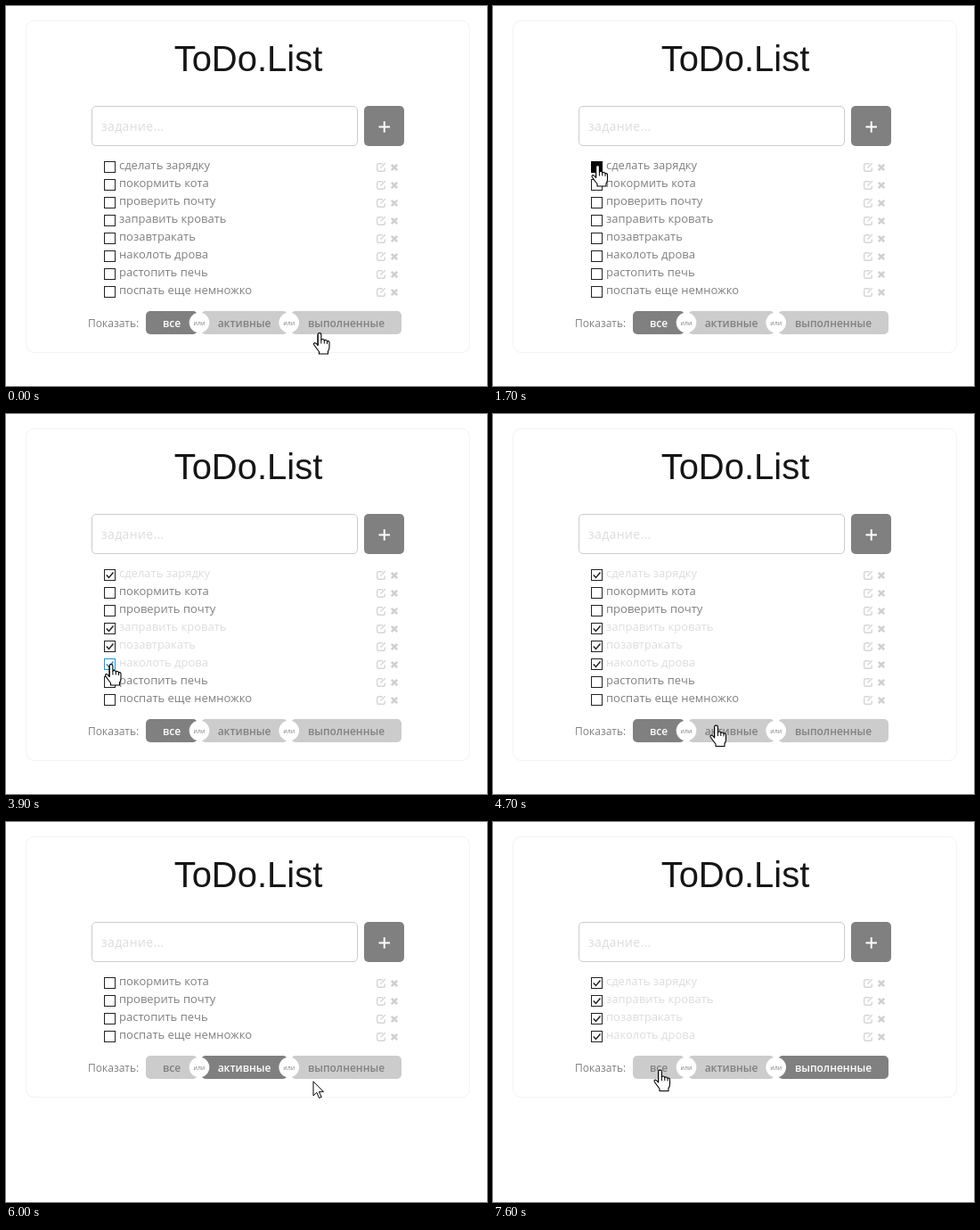
An HTML page for the animation above (8000 ms loop, 540 px wide and 426 px high).

```html
<!DOCTYPE html>
<html lang="ru">
<head>
<meta charset="utf-8">
<title>ToDo.List</title>
<style>
  html, body { margin: 0; width: 100%; height: 100%; overflow: hidden; background: #fff; }
  svg { display: block; width: 540px; height: 426px; }
  text { font-family: "Open Sans", "Noto Sans", sans-serif; fill: #808080; }
  .title { font: 40px "Liberation Sans", Arial, sans-serif; fill: #161616; text-anchor: middle; }
  .hint { font-size: 14px; letter-spacing: .35px; fill: #ddd; }
  .task { font-size: 13px; }
  .label { font-size: 12px; }
  .tab { font-size: 12px; font-weight: 600; text-anchor: middle; }
  .or { font-size: 7px; text-anchor: middle; }
</style>
</head>
<body>
<svg id="stage" viewBox="0 0 540 426">
  <rect id="card" x="22.5" y="16.5" width="498" rx="9" fill="#fff" stroke="#f3f3f3"/>
  <text class="title" x="272" y="73">ToDo.List</text>
  <rect x="96.5" y="112.5" width="298" height="44" rx="4.5" fill="#fff" stroke="#ccc"/>
  <text class="hint" x="107" y="140">задание...</text>
  <rect x="402" y="112" width="45" height="45" rx="5" fill="#808080"/>
  <path d="M418.5 135.5h12.5M424.75 129.2v12.5" stroke="#fff" stroke-width="2"/>
  <g id="list"></g>
  <g id="filter"><text class="label" x="92" y="18">Показать:</text></g>
  <g id="cursor" stroke="#000" stroke-linejoin="round">
    <path id="arrow" fill="#fff" d="M0 0V16L3.8 12.4L6.6 18.6L9.2 17.5L6.4 11.5H11.5Z"/>
    <g id="hand">
      <path fill="#fff" stroke-width="1.1" d="M-1.9 2a1.9 1.9 0 0 1 3.8 0V8a1.8 1.8 0 0 1 3.4 .6a1.8 1.8 0 0 1 3.2 .8a1.6 1.6 0 0 1 2.5 1.4V16Q11 19 9.5 20.5V23.5H-.5V21Q-3 18-6.2 13.3Q-7 11.5-5.5 11Q-4 11-1.9 14Z"/>
      <path fill="none" d="M-1.9 2V14M1.9 8v4M5.3 8.6v3.4M8.5 9.4v3"/>
    </g>
  </g>
</svg>
<script>
const LOOP = 8000, STEP = 100, ROW = 20, LIST_TOP = 171;
const BLUE = '#2196d3';
const $ = id => document.getElementById(id);

function add(parent, tag, attrs, text) {
  const el = document.createElementNS('http://www.w3.org/2000/svg', tag);
  for (const key in attrs) el.setAttribute(key, attrs[key]);
  if (text) el.textContent = text;
  parent.append(el);
  return el;
}

// Tasks with the times of pressing and ticking their boxes
const tasks = [
  ['сделать зарядку', 1700, 1800],
  ['покормить кота'],
  ['проверить почту'],
  ['заправить кровать', 2400, 2600],
  ['позавтракать', 3000, 3100],
  ['наколоть дрова', 3800, 3900],
  ['растопить печь'],
  ['поспать еще немножко']
].map(([name, press = Infinity, tick = Infinity]) => {
  const row = add($('list'), 'g', {});
  const box = add(row, 'rect', { x: 110.5, y: 3.5, width: 12, height: 12 });
  const mark = add(row, 'path', { d: 'M112.8 9.4l2.7 3 5-6', fill: 'none', 'stroke-width': 1.5 });
  const label = add(row, 'text', { class: 'task', x: 127, y: 12 }, name);
  add(row, 'path', {
    d: 'M423 5.7h-4.5q-1.8 0-1.8 1.8v5q0 1.8 1.8 1.8h5q1.8 0 1.8-1.8V10.5M420.5 10.6l5.3-5.3',
    fill: 'none', stroke: '#d6d6d6', 'stroke-width': 1.4
  });
  add(row, 'path', { d: 'M432.8 6.8l6.4 6.4m0-6.4l-6.4 6.4', stroke: '#d0d0d0', 'stroke-width': 2.6 });
  return { row, box, mark, label, press, tick };
});

const tabs = [
  ['все', 157, 58, 186],
  ['активные', 219, 97, 267.5],
  ['выполненные', 320, 124, 382]
].map(([name, x, width, mid]) => ({
  back: add($('filter'), 'rect', { x, y: 0, width, height: 26, rx: 5 }),
  label: add($('filter'), 'text', { class: 'tab', x: mid, y: 17.8 }, name)
}));
for (const x of [217, 317.7]) {
  add($('filter'), 'circle', { cx: x, cy: 13, r: 11.3, fill: '#fff' });
  add($('filter'), 'text', { class: 'or', x, y: 15.5 }, 'или');
}

// Pointer path: time, x, y
const path = [
  [0, 352, 366.5], [300, 350, 170], [500, 275, 70], [700, 180, 110],
  [900, 118, 183], [1200, 117.5, 178.5], [1800, 117.5, 178.5],
  [2300, 117.5, 238.5], [2600, 117.5, 238.5], [2800, 117.5, 258.5],
  [3100, 117.5, 258.5], [3400, 118, 280.5], [4100, 118, 280.5],
  [4700, 250.5, 349], [5300, 250.5, 349], [6100, 358.5, 282.5],
  [6900, 358.5, 282.5], [7400, 194, 281], [7500, 194, 281],
  [7600, 187.5, 278], [LOOP, 187.5, 278]
];

function pointer(t) {
  const i = path.findIndex(p => p[0] > t);
  const [t0, x0, y0] = path[i - 1], [t1, x1, y1] = path[i];
  const k = (t - t0) / (t1 - t0);
  return [x0 + (x1 - x0) * k, y0 + (y1 - y0) * k];
}

const inside = (x, y, left, top, right, bottom) =>
  x >= left && x < right && y >= top && y < bottom;

function draw(t) {
  const [x, y] = pointer(t);
  const active = t < 5200 ? 0 : t < 6600 ? 1 : 2;
  let count = 0;

  for (const { row, box, mark, label, press, tick } of tasks) {
    const done = t >= tick;
    const shown = active === 0 || done === (active === 2);
    row.setAttribute('display', shown ? 'inline' : 'none');
    if (!shown) continue;
    const top = LIST_TOP + ROW * count++;
    const pressed = t >= press && !done;
    const hover = inside(x, y, 109, top + 3, 124, top + 17);
    const ink = hover && !pressed ? BLUE : '#222';
    row.setAttribute('transform', `translate(0 ${top})`);
    box.setAttribute('fill', pressed ? '#000' : '#fff');
    box.setAttribute('stroke', pressed ? '#000' : ink);
    mark.setAttribute('stroke', done ? ink : 'none');
    label.style.fill = done ? '#ddd' : '#808080';
  }

  const listEnd = LIST_TOP + ROW * count, tabTop = listEnd + 11;
  $('card').setAttribute('height', tabTop + 30);
  $('filter').setAttribute('transform', `translate(0 ${tabTop})`);
  tabs.forEach(({ back, label }, i) => {
    back.setAttribute('fill', i === active ? '#808080' : '#ccc');
    label.style.fill = i === active ? '#fff' : '#808080';
  });

  const link = inside(x, y, 109, LIST_TOP, 280, listEnd) ||
    inside(x, y, 157, tabTop, 444, tabTop + 26);
  $('hand').setAttribute('display', link ? 'inline' : 'none');
  $('arrow').setAttribute('display', link ? 'none' : 'inline');
  $('cursor').setAttribute('transform', `translate(${x} ${y})`);
}

const start = performance.now();
function tick() {
  const t = Math.max(0, performance.now() - start) % LOOP;
  draw(Math.floor(t / STEP) * STEP);
  requestAnimationFrame(tick);
}
tick();
</script>
</body>
</html>
```
